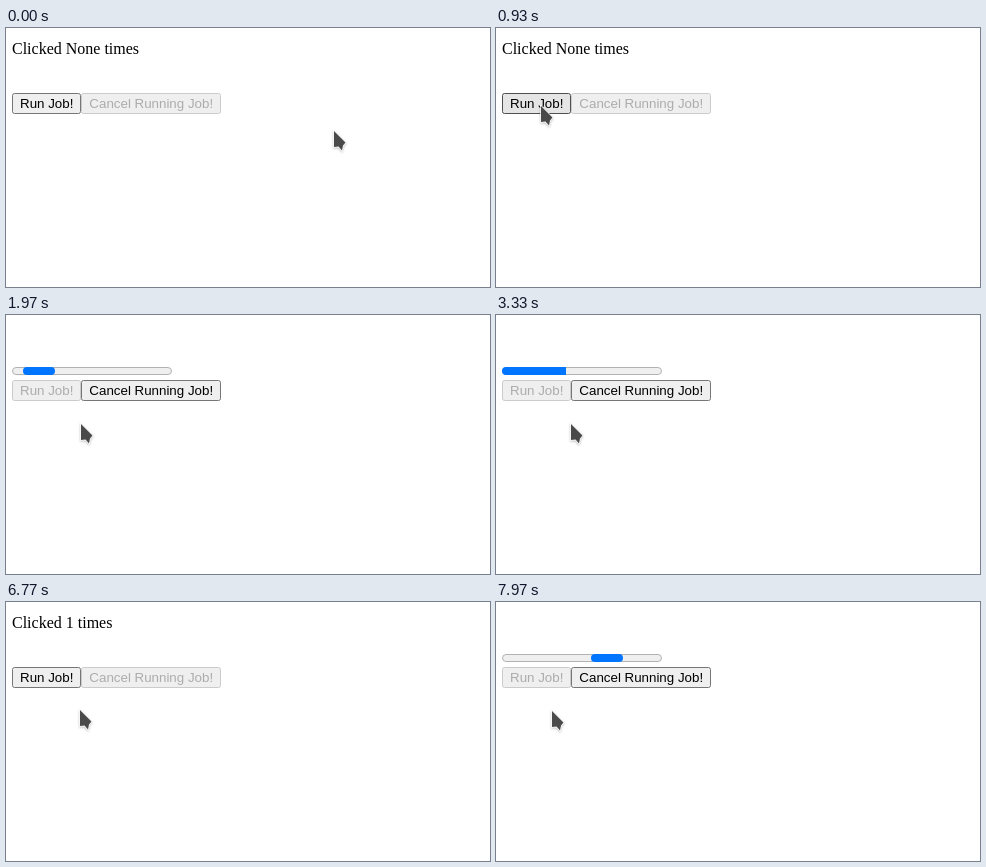
Write an HTML page that moves like this. It is 484 px wide and 259 px high and loops after 8 s.

```html
<!DOCTYPE html>
<html lang="en">
<head>
<meta charset="utf-8">
<title>Background job</title>
<style>
  html, body { margin: 0; width: 100%; height: 100%; overflow: hidden; background: #fff; }
  #stage { position: relative; width: 484px; height: 259px; overflow: hidden; pointer-events: none; }
  #stage > * { position: absolute; }
  #label { left: 6px; top: 12px; margin: 0; font: 16px/17px "Liberation Serif", serif; white-space: pre; color: #000; }
  #bar { left: 6px; top: 52px; width: 160px; height: 8px; border-radius: 4px; background: #efefef; overflow: hidden; }
  #bar::before { content: ""; position: absolute; inset: 0; border: 1px solid #b2b2b2; border-radius: 4px; }
  #fill { position: absolute; top: 0; height: 8px; background: #0075ff; }
  #buttons { left: 6px; top: 65px; display: flex; }
  .button {
    box-sizing: border-box; height: 21px; padding: 2px 7px; border: 1px solid #767676; border-radius: 2.5px;
    background: #efefef; color: #000; font: 13.3333px/15px "Liberation Sans", sans-serif; white-space: pre;
  }
  .hover { background: #e5e5e5; border-color: #4f4f4f; }
  .active { background: #f5f5f5; border-color: #8d8d8d; }
  .disabled { border-color: #cbcbcb; color: #acacac; }
  #cursor { left: 0; top: 0; overflow: visible; filter: drop-shadow(0 1px 1px rgba(0, 0, 0, .25)); }
</style>
</head>
<body>
<div id="stage">
  <p id="label"></p>
  <div id="bar"><div id="fill"></div></div>
  <div id="buttons"><span id="run">Run Job!</span><span id="cancel">Cancel Running Job!</span></div>
  <svg id="cursor" width="12" height="20">
    <path d="M0 0V16L4.5 15.5 8 19.5 9 14.5 11.5 11.5Z" fill="#4a4a4a" stroke="#fff" stroke-width="1.4" paint-order="stroke"/>
  </svg>
</div>
<script>
const LOOP = 8000;
const $ = id => document.getElementById(id);
const [label, bar, fill, run, cancel, cursor] =
  ["label", "bar", "fill", "run", "cancel", "cursor"].map($);

// [start, state of the Run button]; "disabled" while a job is running
const states = [
  [0, ""], [900, "hover"], [1130, "active"], [1230, "hover"], [1290, "disabled"],
  [6330, ""], [6960, "hover"], [7270, "active"], [7370, "hover"], [7430, "disabled"]
];

// [start, end, from, to, optional curve control point]
const moves = [
  [0, 830, [328, 103], [45, 84], [205, 190]],
  [870, 930, [45, 84], [45, 78]],
  [1480, 1740, [45, 78], [75, 109]],
  [6740, 7030, [75, 109], [50, 73]],
  [7480, 7740, [50, 73], [55, 114]],
  [7740, 7900, [55, 114], [56, 109]]
];

const ease = p => p * p * (3 - 2 * p);
const latest = (list, t) => list.filter(item => item[0] <= t).pop();

function cursorAt(t) {
  const [start, end, a, b, c] = latest(moves, t);
  const p = ease(Math.min(1, (t - start) / (end - start)));
  return a.map((v, i) => {
    const mid = c ? c[i] : (v + b[i]) / 2;
    return Math.round(v * (1 - p) ** 2 + 2 * mid * p * (1 - p) + b[i] * p * p);
  });
}

// The waiting chunk bounces over 128 px in 1250 ms, redrawn every 125 ms.
function chunkAt(t, tick, zero) {
  const time = tick + Math.floor((t - tick) / 125) * 125;
  const phase = (((time - zero) % 2500) + 2500) % 2500 / 1250;
  return Math.round(128 * (phase < 1 ? phase : 2 - phase));
}

function setFill(x, width, radius) {
  fill.style.left = x + "px";
  fill.style.width = width + "px";
  fill.style.borderRadius = radius + "px";
}

function draw(t) {
  const state = latest(states, t)[1];
  const running = state === "disabled";
  run.className = "button " + state;
  cancel.className = "button " + (running ? "" : "disabled");
  label.textContent = `Clicked ${t < 6330 ? "None" : 1} times`;
  label.style.visibility = running ? "hidden" : "visible";
  bar.style.visibility = running ? "visible" : "hidden";

  if (t < 2330) setFill(chunkAt(t, 1970, 2077), 32, 4);
  else if (t < 6330) setFill(0, 32 * (1 + Math.floor((t - 2330) / 1000)), 0);
  else setFill(chunkAt(t, 7970, 7101), 32, 4);

  const [x, y] = cursorAt(t);
  cursor.style.transform = `translate(${x}px, ${y}px)`;
}

const begin = performance.now();
function frame() {
  draw((performance.now() - begin) % LOOP);
  requestAnimationFrame(frame);
}
draw(0);
requestAnimationFrame(frame);
</script>
</body>
</html>
```
